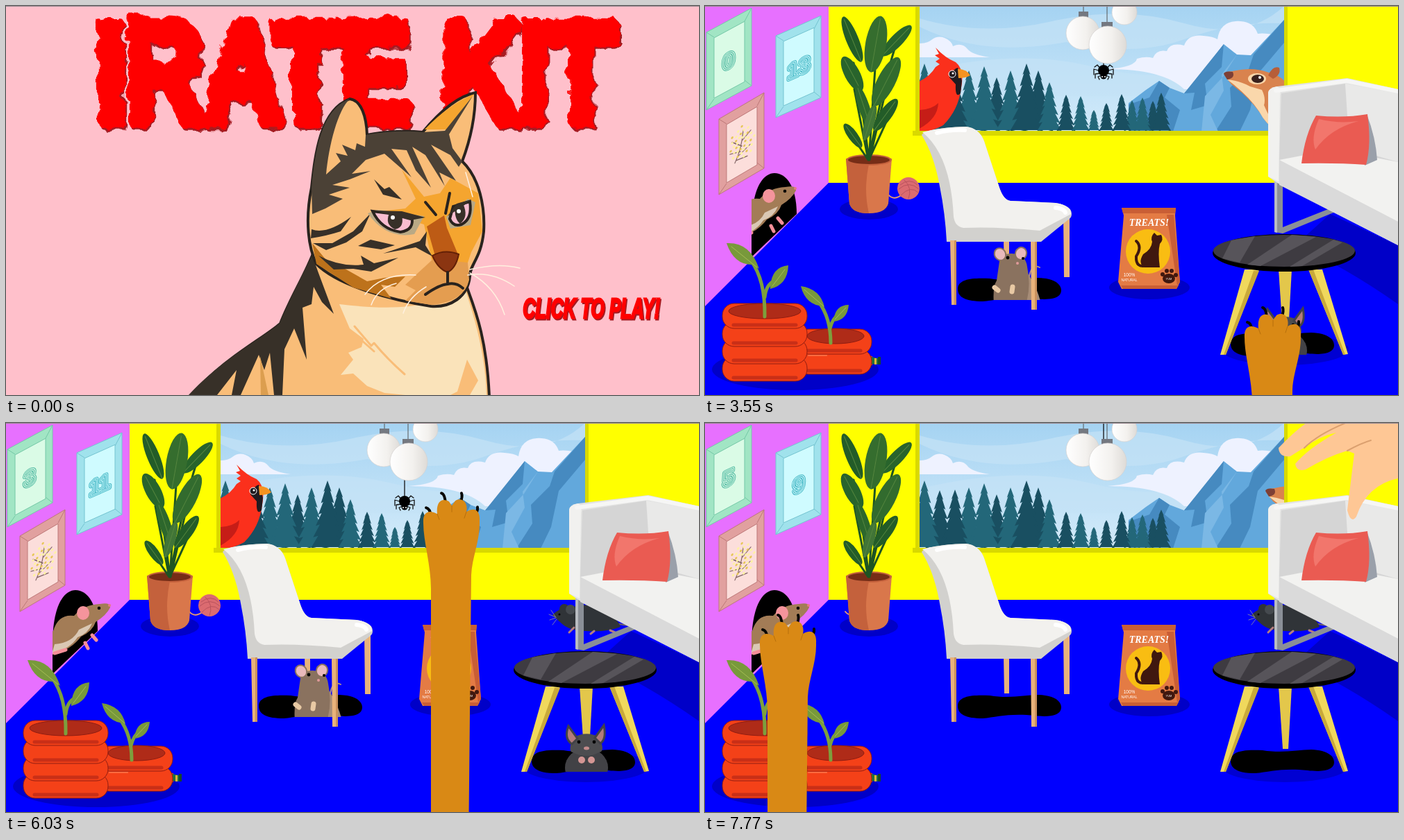
An HTML page for the animation above (8 s loop, 998 by 561 pixels).

```html
<!DOCTYPE html>
<html lang="en">
<head>
<meta charset="utf-8">
<title>Irate Kit</title>
<style>
html,body{margin:0;width:100%;height:100%;overflow:hidden;background:#ffc0cb}
svg{display:block;width:100vw;height:100vh}
text{font-family:"Liberation Sans",Arial,sans-serif;text-anchor:middle}
.line{fill:none;stroke-linecap:round;stroke-linejoin:round}
.dark{fill:#373028}
</style>
</head>
<body>
<svg viewBox="0 0 998 561">
<defs>
  <linearGradient id="sky" x2="0" y2="1"><stop stop-color="#a5d3f2"/><stop offset="1" stop-color="#d3ebfa"/></linearGradient>
  <linearGradient id="globe"><stop stop-color="#fff"/><stop offset=".6" stop-color="#f3f1ee"/><stop offset="1" stop-color="#dedbd7"/></linearGradient>
  <filter id="drip" x="-5%" y="-10%" width="110%" height="120%"><feTurbulence baseFrequency=".035" numOctaves="2" seed="4"/><feDisplacementMap in="SourceGraphic" scale="16"/></filter>
  <clipPath id="pane"><path d="M309 0H834V181H309Z"/></clipPath>
  <clipPath id="burrow"><path d="M67 230H220V400H67Z"/></clipPath>
  <clipPath id="chairPit"><path d="M360 300H520V424H360Z"/></clipPath>
  <clipPath id="tablePit"><path d="M750 380H915V503H750Z"/></clipPath>
  <path id="pit" d="M364 408C364 392 390 392 410 393C440 398 460 392 480 392C505 393 513 402 513 410C513 424 490 424 475 422C440 418 420 424 400 426C375 426 364 420 364 408Z"/>
</defs>

<g id="room">
  <path fill="#ff0" d="M178 0H998V255H178Z"/>
  <path fill="#00f" d="M0 255H998V561H0Z"/>
  <path fill="#e770ff" d="M0 0H178V255L0 433Z"/>

  <g clip-path="url(#pane)">
    <path fill="url(#sky)" d="M309 0H834V181H309Z"/>
    <path fill="#c5e3f7" opacity=".7" d="M309 18Q400 45 500 22T690 25T834 0V25Q760 22 690 48T520 52Q400 75 309 30ZM309 95Q450 60 560 88T834 80V130H309Z"/>
    <path fill="#eef2ff" d="M309 54Q320 54 326 49Q335 42 345 46Q355 50 357 58Q370 52 378 62Q384 70 410 74H309Z"/>
    <path fill="#eef2ff" d="M580 91Q620 88 622 76Q635 72 645 75Q650 62 665 65Q670 52 690 57Q696 40 718 43Q732 44 738 48Q742 20 771 22Q790 23 796 40Q812 38 834 46V120H690Q660 91 580 91Z"/>
    <path fill="#62a8dc" d="M610 140L635 121 654 108 669 118 690 126 710 104 747 55 766 70 786 71 834 20V181H610Z"/>
    <path fill="#468ac0" d="M654 108L669 118 662 132 684 150 674 181H610V142L640 132ZM747 55L744 88 720 112 724 143 700 150 705 125 690 126ZM834 20V53L796 98 785 150 770 181H735L758 145 756 118 783 91 790 70Z"/>
    <path fill="#7bb8e5" d="M766 70L744 99 747 122 728 157 739 181H715L720 130 746 102Z"/>
    <g id="trees"></g>
    <g id="bird">
      <path fill="#fb301c" d="M300 181V112Q322 105 332 88L338 84 332 80 338 76 331 71 337 69 332 60Q346 75 361 81Q374 91 369 118Q365 150 343 172Q330 179 318 181Z"/>
      <path fill="#c61d17" d="M300 150Q325 151 336 140Q335 166 300 181Z"/>
      <path fill="#211b20" d="M364 89Q368 100 370 108L368 126Q360 134 361 113L352 103Q358 90 364 89Z"/>
      <path fill="#f59320" d="M364 91Q377 91 382 100Q376 104 365 104Z"/>
      <circle cx="356" cy="98" r="5" fill="#211b20" stroke="#fff"/><circle cx="357" cy="97" r="1.5" fill="#fff"/>
    </g>
    <g id="squirrel">
      <path fill="#d9834e" d="M678 100Q678 94 690 94Q718 87 742 96Q760 100 768 113Q800 110 850 118V181H760Q740 175 730 155Q712 130 688 113Z"/>
      <path fill="#fad7ab" d="M682 106Q700 108 715 116L732 121Q738 133 735 143Q742 160 756 181Q738 172 728 152Q712 128 682 106ZM795 181Q797 158 812 149L850 145V181Z"/>
      <path fill="#854532" d="M780 127Q805 119 850 123V132Q810 131 780 127Z"/>
      <path fill="#b75e39" d="M741 100Q748 85 757 89Q760 99 748 105Z"/>
      <ellipse cx="725" cy="105" rx="13" ry="8" fill="#fad7ab"/><ellipse cx="726" cy="105" rx="9" ry="6" fill="#3a211d"/><circle cx="729" cy="103" r="2" fill="#fff"/>
      <path fill="#7d3f36" d="M677 98Q678 93 690 95Q694 104 682 106Z"/>
    </g>
  </g>
  <path fill="#d9d900" d="M303 0H309V180H834V0H839V180H845V187H299V180H303Z"/>

  <g id="spider">
    <path class="line" stroke="#111" stroke-width="1.3" d="M0-60V0M-4-2L-9-8-13-5M-4 1L-14-2-14 6M-4 4L-12 5-12 11M-3 7L-8 9-6 13M4-2L9-8 13-5M4 1L14-2 14 6M4 4L12 5 12 11M3 7L8 9 6 13"/>
    <circle r="8"/><circle cy="8" r="4.5"/><circle cx="-2" cy="9" r="1" fill="#fff"/><circle cx="2" cy="9" r="1" fill="#fff"/>
  </g>
  <path stroke="#555" d="M545 0V10M579 0V24"/>
  <path fill="#747880" d="M538 8H552V18H538ZM571 23H587V34H571Z"/>
  <g fill="url(#globe)" stroke="#d5d2d0" stroke-width=".7"><circle cx="604" cy="9" r="18"/><circle cx="544" cy="39" r="24"/><circle cx="580" cy="56" r="27"/></g>

  <g id="frames"></g>
  <g id="posy" transform="translate(53 202) skewY(-25)"></g>
  <g id="score" transform="translate(34 89) skewY(-25)"></g>
  <g id="timer" transform="translate(135 99) skewY(-24)"></g>

  <path d="M67 362V320C67 260 85 241 100 241C118 241 132 262 132 300Z"/>
  <g clip-path="url(#burrow)"><g id="holeRat">
    <path fill="#a37c56" d="M30 330L68 300Q75 275 98 278Q112 262 135 261Q151 258 150 266Q145 277 129 287Q125 300 108 308Q95 326 68 334Z"/>
    <path fill="#dac8b4" d="M124 289Q118 304 103 309Q92 326 66 333L70 319Q96 317 105 298Z"/>
    <path class="line" stroke="#f58f98" stroke-width="5" d="M114 317L118 325M124 306L130 313M70 332L86 327"/>
    <ellipse cx="111" cy="274" rx="9" ry="10" fill="#f5949c"/><circle cx="134" cy="267" r="2.3"/><circle cx="149" cy="263" r="2" fill="#e87a83"/>
  </g></g>

  <ellipse cx="236" cy="293" rx="42" ry="15" fill="#0000c8"/>
  <g id="yarn"><path class="line" stroke="#e59a70" stroke-width="2" d="M264 272Q272 282 285 271"/><circle cx="293" cy="263" r="16" fill="#db6b70"/><path class="line" stroke="#b9525c" d="M281 258Q295 247 306 258M279 264Q294 251 308 264M282 273Q296 258 307 269M287 251Q299 262 293 278"/></g>
  <path fill="#d9774b" d="M203 220L208 285Q212 299 236 299Q260 299 264 285L269 220Z"/>
  <path fill="#c4613c" d="M203 220L208 285Q212 299 236 299Q228 265 236 228Z"/>
  <ellipse cx="236" cy="222" rx="33" ry="8" fill="#c4613c"/><ellipse cx="236" cy="222" rx="30" ry="6" fill="#762d17"/>
  <path class="line" stroke="#1d5422" stroke-width="3" d="M236 222L245 90M236 222Q228 150 214 82M236 222Q252 130 275 55M235 222L215 120M237 222L263 110M236 222L262 165M235 222L210 185"/>
  <g id="leaves"></g>

  <path fill="#e8b27b" d="M430 335H438V390H431ZM516 300H525V391H517Z"/>
  <use href="#pit"/>
  <g clip-path="url(#chairPit)"><g id="chairRat">
    <path class="line" stroke="#b08f89" stroke-width="2" d="M466 394Q470 370 482 377"/>
    <path fill="#a68c77" d="M455 375Q476 395 484 430H440Z"/>
    <path fill="#8a725f" d="M424 368Q428 356 442 357Q462 358 464 376Q470 405 462 430H416Q414 405 420 396Z"/>
    <g fill="#e9b9bb" stroke="#8a725f" stroke-width="2"><ellipse cx="425" cy="358" rx="8" ry="9" transform="rotate(-30 425 358)"/><ellipse cx="455" cy="357" rx="8" ry="9" transform="rotate(20 455 357)"/></g>
    <circle cx="436" cy="363" r="2.4"/><circle cx="458" cy="364" r="2"/><circle cx="450" cy="371" r="2" fill="#e09a9a"/>
    <path class="line" stroke="#e8c9a4" stroke-width="7" d="M442 412L443 405M417 406L422 410"/>
  </g></g>
  <path fill="#d2d1ce" d="M312 186Q318 176 375 174Q395 176 402 195L424 262Q430 280 440 281L505 284Q528 288 528 300Q528 306 522 309L484 340H348Q346 300 338 260Q330 215 312 186Z"/>
  <path fill="#f2f1ee" d="M313 182Q345 174 376 174Q395 176 402 195L424 262Q430 280 440 281L505 284Q528 288 527 300L482 324Q420 318 372 320Q360 318 358 304Q354 215 313 182Z"/>
  <path class="line" stroke="#fff" stroke-width="6" d="M334 183Q352 178 374 179M505 291Q517 292 519 298"/>
  <path fill="#e8b27b" d="M353 338H362V431H355ZM469 340H478V438H470Z"/><path fill="#ca915d" d="M359 338H362V431H359ZM475 340H478V438H475Z"/>

  <ellipse cx="640" cy="406" rx="58" ry="17" fill="#0000c8"/>
  <path fill="#e47b44" d="M600 291H678L677 302 684 398 679 408H600L595 398 603 302Z"/>
  <path fill="#c95e35" d="M600 291H678L677 299H602ZM599 403H682L679 408H602ZM675 301L684 398 680 403 665 301Z"/>
  <circle cx="638" cy="354" r="32" fill="#f9bd12"/>
  <path fill="#40180f" d="M647 327L651 331 657 330Q661 337 655 343Q652 355 655 377H633Q623 371 631 358Q643 351 644 340Q641 333 647 327Z"/>
  <path class="line" stroke="#40180f" stroke-width="4" d="M637 374Q620 379 621 361Q630 347 621 339"/>
  <text x="639.5" y="317" fill="#fff" font-size="14" font-weight="700" font-style="italic" style="font-family:'Liberation Serif',serif">TREATS!</text>
  <g fill="#fff" font-size="6.5"><text x="611" y="390">100%</text><text x="611" y="397" font-size="5">NATURAL</text></g>
  <g fill="#40180f"><ellipse cx="668" cy="393" rx="9" ry="7"/><circle cx="659" cy="387" r="3"/><circle cx="665" cy="382" r="3"/><circle cx="672" cy="382" r="3"/><circle cx="678" cy="388" r="3"/></g>
  <text x="668" y="395" fill="#fff" font-size="4">YUM</text>

  <path fill="#0000c8" d="M900 300L998 345V430Q920 375 850 345Z"/>
  <g id="darkRat">
    <path class="line" stroke="#6c6266" stroke-width="2" d="M865 285Q890 294 925 293"/>
    <path fill="#303438" d="M787 277Q798 265 812 267Q835 257 860 269Q880 280 885 294Q865 302 835 300Q812 300 800 289Z"/>
    <path class="line" stroke="#b47e80" stroke-width="3" d="M818 295L811 302M847 300L842 304M870 299L877 302"/>
    <circle cx="804" cy="268" r="7" fill="#303438"/><circle cx="813" cy="269" r="7" fill="#454a4f"/><circle cx="797" cy="276" r="1.5" fill="#000"/>
    <path class="line" stroke="#96999c" stroke-width=".8" d="M792 280L782 276M792 281L783 284M793 283L787 291M791 279L785 270"/>
  </g>
  <path fill="#8a8f97" d="M820 249H832V328L820 326ZM832 319L915 286 922 291 832 328Z"/><path fill="#b8bcc1" d="M820 249H824V327L820 326Z"/>
  <path fill="#e3e3e2" d="M811 125Q812 118 824 116L925 104 998 120V345L824 255 811 246Z"/>
  <path fill="#d5d5d5" d="M830 126L922 112 928 158 998 170V235L827 222Z"/>
  <path fill="#e9e9e8" d="M922 112L998 126V225L928 205Z"/>
  <path fill="#f2f2f0" d="M827 222L905 207 998 225V311Z"/>
  <path fill="#dadada" d="M827 222L998 311V345L827 258Z"/>
  <path fill="#f1f1ef" d="M811 125Q812 118 824 116Q830 118 828 130L826 253 811 246Z"/>
  <path class="line" stroke="#f6f6f5" stroke-width="6" d="M822 122L924 108 998 123"/>
  <path fill="#9aa0aa" d="M953 156Q966 190 968 222L950 230Z"/>
  <path fill="#ea5b52" d="M880 158Q920 162 954 156Q960 200 952 229Q910 226 859 227Q864 185 880 158Z"/>
  <path fill="#f2766c" d="M884 163Q912 170 941 166Q900 177 879 207Q872 190 884 163Z"/>

  <ellipse cx="835" cy="495" rx="92" ry="23" fill="#0000d2"/>
  <use href="#pit" x="393" y="79"/>
  <path fill="#e3c74b" d="M826 380H845L840 470H832Z"/>
  <g clip-path="url(#tablePit)"><g id="tableRat">
    <ellipse cx="836" cy="497" rx="31" ry="28" fill="#424246"/>
    <path fill="#4d4d50" d="M816 454Q836 443 854 453Q864 474 854 475Q836 485 816 475Q809 474 816 454Z"/>
    <g fill="#b27b7b" stroke="#424246" stroke-width="3"><path d="M823 455L810 437Q803 455 815 463ZM848 454L861 436Q865 456 856 462Z"/></g>
    <circle cx="825" cy="460" r="2.4"/><circle cx="847" cy="460" r="2.4"/><ellipse cx="836" cy="469" rx="4" ry="2.5" fill="#c38b8b"/>
    <g fill="#d49694"><circle cx="829" cy="486" r="5"/><circle cx="843" cy="486" r="5"/></g>
  </g></g>
  <path fill="#f0d85c" d="M777 380H798L750 503H742ZM869 380H889L926 502 919 503Z"/><path fill="#c9a93a" d="M790 382H798L750 503H747ZM869 380H876L922 503H919Z"/>
  <ellipse cx="834" cy="356" rx="103" ry="27"/><ellipse cx="834" cy="353" rx="102" ry="23" fill="#3e3b41"/>
  <path fill="#57545a" d="M758 338L792 332 770 370 745 364ZM845 330L880 333 800 375 781 373ZM905 337L918 341 860 375 842 376Z"/>

  <ellipse cx="130" cy="524" rx="120" ry="30" fill="#0000c8"/>
  <g id="nozzle"><path fill="#e23a1b" d="M228 505H241V518H228Z"/><path fill="#24733b" d="M239 506L249 508V517L239 516Z"/><path fill="#e6b53b" d="M244 508H247V517H244Z"/><path fill="#17452b" d="M249 506H253V517H249Z"/></g>
  <g id="hoses"></g>
  <g class="line" stroke="#7d9f3d" stroke-width="5"><path d="M86 448Q87 395 66 367M86 420Q88 402 99 397M181 486Q181 450 164 427M180 465Q184 450 192 445"/></g>
  <g fill="#78993b"><path d="M69 373Q42 374 31 342Q65 340 78 379ZM94 405Q96 376 120 374Q119 402 94 408ZM171 433Q145 432 138 404Q166 408 172 434ZM185 453Q188 431 207 431Q205 453 185 455Z"/></g>
  <path class="line" stroke="#a6bd55" d="M38 347L75 377M97 404L115 380M143 409L171 433M187 452L203 435"/>

  <g id="hand">
    <path fill="#fec795" d="M838 204Q800 190 760 190Q722 194 690 208Q660 225 629 258Q630 272 646 270L665 258Q690 240 712 236Q670 260 653 281Q655 293 668 289Q700 270 728 262L738 266Q730 330 728 348Q733 368 741 357Q756 312 800 302Q850 290 880 250L1250-274 1200-364Z"/>
    <path class="line" stroke="#dba06f" stroke-width="2" d="M666 258Q692 232 755 211M728 262Q748 251 762 247M806 298Q840 280 850 262"/>
  </g>
  <g id="paw">
    <path class="line" stroke="#080704" stroke-width="4" d="M-15 2Q-10 3-9 17M14 2Q16 7 12 17M-37 23Q-31 24-30 36M37 22Q38 29 31 36"/>
    <path fill="#d98915" d="M-30 620V140C-30 105-41 72-41 45C-42 30-34 25-21 32C-23 14-14 8-4 14L0 20 5 13C15 7 24 16 21 29C34 21 41 28 40 42C41 70 29 95 28 120L23 620Z"/>
    <path class="line" stroke="#b66f0c" d="M-21 32L-18 40M0 20V29M21 29L18 38"/>
  </g>
</g>

<g id="intro">
  <path fill="#ffc0cb" d="M0 0H998V561H0Z"/>
  <g filter="url(#drip)" stroke-linejoin="round" font-weight="700">
    <g id="title" transform="translate(499 162) scale(1 1.3)" font-size="155" stroke-width="15"></g>
  </g>
  <g id="prompt" transform="translate(843 450) scale(1 1.6)" font-size="25" font-weight="700" font-style="italic" stroke-width="1.8"></g>

  <path fill="#f9bd78" stroke="#29231e" stroke-width="4" d="M265 564C310 510 370 480 395 458C412 415 430 390 445 350L660 395C672 430 692 470 696 564Z"/>
  <path fill="#fae3ba" d="M480 430C560 440 620 435 660 405C675 450 690 500 692 561H668L680 540 664 510 650 556 640 561H575L545 558 520 548 500 530 482 532 500 510 493 500 512 492 515 480 495 465Z"/>
  <path class="line" stroke="#f9bd78" stroke-width="3" d="M502 462L526 490 530 486Q550 510 574 531M512 482L530 498"/>
  <path class="dark" d="M263 561C310 510 365 482 394 458C410 420 428 385 441 360L450 385 472 444 455 427 443 405 440 430 427 435 433 510 415 465 401 495 398 561H386L380 500 372 525 364 503 338 561H325L332 525 304 561Z"/>
  <path fill="#dc9e4f" d="M366 505L378 561H367Z"/>
  <path id="head" fill="#f9bd78" stroke="#29231e" stroke-width="4" d="M440 262C445 215 452 150 495 134C512 136 519 160 520 186C548 180 580 180 600 182C625 152 650 130 676 125C676 160 668 195 657 224C682 248 690 290 688 325C684 365 668 372 668 390C665 420 640 435 612 433C560 425 480 405 447 372C436 350 430 310 440 262Z"/>
  <path fill="#f5a52f" d="M570 236L602 275 625 270 640 248 680 270 686 325 670 355 655 400 615 375 602 315 540 296 575 292 590 278ZM603 178Q637 142 674 127L636 178Z"/>
  <path fill="#bd721b" d="M441 342L460 365 490 380 520 397 545 392 575 390 560 405 540 402 555 422 500 406 447 372Z"/>
  <path fill="#e49d50" d="M590 388L615 365 665 370 667 395Q660 427 612 431L575 425 590 410 575 402Z"/>
  <path fill="#4b4136" d="M440 262C445 215 452 150 495 134C478 150 465 200 461 243L482 224 475 212 492 216 484 200 503 208 505 198 517 203 518 186C548 180 580 180 600 182L632 180 672 130 638 185 643 205 657 224 652 232 640 215 612 200 648 252 624 240 632 260 604 215 585 203 612 262 590 237 577 208 555 206 584 247 545 213 518 222 498 242 525 238 495 250 470 258 495 262 465 272 485 278 460 292 441 300Z"/>
  <path class="dark" d="M530 250L545 264 552 261 570 279 543 272ZM440 322Q462 330 497 304L482 325Q460 332 439 335ZM442 342L470 342 500 325 525 299 513 325 490 341 461 352ZM450 360Q482 377 515 373L511 360 530 371 565 363 526 383 500 379 472 380ZM507 346L525 337 560 345 540 351ZM543 357L596 339 606 325 604 345 614 361 590 348Z"/>
  <path fill="#b9a985" d="M521 299L535 294 602 303 588 329Q548 337 521 299ZM634 304L665 278 676 283 669 316 640 321Z"/>
  <g fill="#f8bdd0" stroke="#29231e" stroke-width="4"><path d="M528 296L584 303Q589 323 568 326Q540 322 528 296ZM639 307L644 289 668 282Q672 307 656 315Q644 319 639 307Z"/></g>
  <path class="dark" d="M552 299L570 302Q574 320 560 322Q545 315 552 299ZM647 289L658 285Q667 304 654 314Q645 307 647 289ZM530 295L570 296 604 305 582 309ZM636 303L649 285 670 279 659 288Z"/>
  <circle cx="557" cy="305" r="3" fill="#fff"/><circle cx="652" cy="296" r="3" fill="#fff"/>
  <path fill="#bd5b15" d="M606 318L631 302 635 320 650 356 619 364Z"/><path fill="#8b3511" stroke="#632006" stroke-width="2" d="M614 360Q632 350 652 358Q648 378 636 384Q622 379 614 360Z"/>
  <path class="line" stroke="#29231e" stroke-width="4" d="M636 384V401Q624 402 604 416M636 401Q648 398 658 407M604 283L619 301M639 270L633 299"/>
  <path class="line" stroke="#fff0df" stroke-width="1.5" d="M668 380Q710 370 740 378M668 385Q705 405 718 445M665 388Q700 382 732 404M590 388Q540 385 517 416M605 405Q580 420 572 443M562 400Q535 407 526 431M672 275L662 240"/>
</g>
<path stroke="#9b8a92" d="M0 .5H998"/>
</svg>
<script>
const el = id => document.getElementById(id);
const fill = (id, parts) => el(id).innerHTML = parts.join('');

function tree([x, top], i) {
  const h = 181 - top, right = [], left = [];
  for (let k = 1; k < 7; k++) {
    const y = top + h * k / 6, w = 2 + h * .038 * k;
    right.push(`${x + w} ${y}`, `${x + w * .65} ${y - 2}`);
    left.unshift(`${x - w * .65} ${y - 2}`, `${x - w} ${y}`);
  }
  return `<path fill="${i % 2 ? '#236779' : '#194f61'}" d="M${x} ${top}L${right.join(' ')} ${left.join(' ')}Z"/>`;
}
fill('trees', [[338,97],[380,93],[420,103],[440,93],[480,93],[560,150],[578,140],[615,136],[645,137],
  [316,83],[360,96],[402,87],[463,83],[496,110],[520,128],[541,130],[600,127],[630,132],[657,125]].map(tree));

fill('frames', [[2,38,65,35,112,'#a1e5c4','#dafbe6','#75c8a7'], [102,43,65,29,118,'#a0e2ec','#cffbff','#74c4d1'], [20,163,65,38,109,'#e1a09f','#fcdedb','#bd7878']]
  .map(([x, y, w, rise, h, border, paper, edge]) =>
    `<path fill="${border}" stroke="${edge}" d="M${x} ${y}l${w}-${rise}v${h}l-${w} ${rise}z"/>
     <path stroke="${edge}" d="M${x} ${y}l11 7M${x + w} ${y - rise}l-10 19M${x + w} ${y - rise + h}l-10-8M${x} ${y + h}l11-16"/>
     <path fill="${paper}" stroke="${edge}" d="M${x + 11} ${y + 8}l44-${rise * .68}v${h - 25}l-44 ${rise * .68}z"/>`));

const stems = '<path class="line" stroke="#826465" stroke-width="1.3" d="M-10 20Q0 4 2-22M0 0L-14-12M1-8L13-17M-5 12L12 3M-2 7L-17 4M-8 17L8 18"/>';
fill('posy', [stems, ...Array.from({length: 38}, (_, i) => {
  const a = i * 2.4, r = 5 + i * .38;
  return `<circle cx="${r * Math.cos(a)}" cy="${-5 + 1.25 * r * Math.sin(a)}" r="1.7" fill="${i % 3 ? '#fff2a1' : '#e6c757'}"/>`;
})]);

fill('leaves', [[212,48,9,35,-22,'#235c28'],[276,50,9,30,44,'#28642c'],[246,55,15,41,10,'#356d2e'],[212,98,11,28,-28,'#28642c'],[261,109,13,39,27,'#326b2e'],[260,157,9,28,36,'#235c28'],[229,146,8,33,-18,'#2d672c'],[237,168,7,27,17,'#417537'],[213,187,7,21,-36,'#235c28']]
  .map(([x, y, rx, ry, turn, color]) => `<g transform="translate(${x} ${y}) rotate(${turn})" fill="${color}"><ellipse rx="${rx}" ry="${ry}"/><path fill="#184a22" d="M0-${ry}Q${rx * 2}0 0 ${ry}Z"/><path stroke="#55853f" d="M0-${ry - 4}V${ry}"/></g>`));

const coil = (x, y, w) => `<rect x="${x}" y="${y}" width="${w}" height="36" rx="17" fill="#f44118" stroke="#8f1d12"/><path class="line" stroke="#c92f17" stroke-width="5" d="M${x + 16} ${y + 31}H${x + w - 16}"/><path class="line" stroke="#ff6b40" stroke-width="2" d="M${x + 17} ${y + 9}H${x + w * .4}"/>`;
const mouth = (x, y, rx) => `<ellipse cx="${x}" cy="${y}" rx="${rx}" ry="11" fill="#af2b18" stroke="#8f1d12"/>`;
fill('hoses', [coil(132, 495, 108), coil(132, 466, 108), mouth(188, 476, 41), ...[505, 480, 455, 429].map(y => coil(25, y, 122)), mouth(86, 440, 52)]);

const shadowed = (s, d) => [`<text x="${d}" y="${d}" fill="#a51b22" stroke="#a51b22">${s}</text>`, `<text fill="#f00" stroke="#f00">${s}</text>`];
fill('title', shadowed('IRATE KIT', 2));
fill('prompt', shadowed('CLICK TO PLAY!', 1.5));

// Nested strokes give the digits their parallel lines.
const digits = (id, value, ink, paper) => fill(id, [[7, ink], [5, paper], [3, ink], [1, paper]]
  .map(([w, c]) => `<text font-size="29" fill="none" stroke="${c}" stroke-width="${w}" stroke-linejoin="round">${value}</text>`));

const steps = [0,1490,1750,2020,2290,2560,2790,3020,3250,3550,3800,4040,4270,4520,4790,5040,5280,5530,5780,6030,6280,6530,6780,7040,7270,7540,7770];
const hits = [3800, 4790, 5280, 6280, 7270];

// Linear track through [time, value] keys.
function track(t, keys) {
  if (t <= keys[0][0]) return keys[0][1];
  for (let i = 1; i < keys.length; i++) {
    const [t0, v0] = keys[i - 1], [t1, v1] = keys[i];
    if (t <= t1) return v0 + (v1 - v0) * (t - t0) / (t1 - t0);
  }
  return keys.at(-1)[1];
}
const move = (id, x, y) => el(id).setAttribute('transform', `translate(${x} ${y})`);

function draw(t) {
  el('intro').style.display = t < 1490 ? '' : 'none';
  digits('score', hits.filter(h => h <= t).length, '#55bca4', '#dafbe6');
  digits('timer', 15 - Math.max(0, Math.ceil((t - 2289) / 1000)), '#42b6c4', '#cffbff');

  move('bird', track(t, [[2290,-80],[3250,0],[7040,0],[7270,-80]]), 0);
  move('squirrel', track(t, [[3020,165],[3550,70],[4040,0],[5280,0],[5530,110],[5780,180],[7270,180],[7540,165],[7770,130]]), 0);
  el('squirrel').style.filter = t >= 5280 && t < 6030 ? 'hue-rotate(245deg)' : '';
  move('spider', 574, track(t, [[2020,55],[2290,68],[3550,93],[4040,113],[6030,113],[6530,50]]));
  move('holeRat', track(t, [[2290,-95],[3250,-25],[3550,-19],[4040,0]]), 0);
  move('yarn', track(t, [[2290,-62],[3250,0],[6030,0],[6530,-62]]), 0);
  move('chairRat', 0, track(t, [[2290,85],[3250,0],[6030,0],[6530,85]]));
  move('tableRat', 0, track(t, [[2560,75],[3250,0],[3550,0],[4040,75],[5280,75],[5530,54],[6030,0],[7270,0],[7540,75]]));
  move('darkRat', track(t, [[5040,150],[5530,53],[6030,0]]), 0);
  move('nozzle', track(t, [[1750,-30],[2290,0]]), 0);

  const away = track(t, [[3550,1.7],[4270,0],[4790,0],[5280,1.7],[7270,1.7],[7770,1]]);
  move('hand', 197 * away, -222 * away);
  const pawX = track(t, [[1490,596],[2020,594],[2290,633],[2790,760],[3250,826],[3550,818],[4040,815],[4520,765],[5530,766],[6280,580],[6780,456],[7040,391],[7270,345],[7770,120]]);
  const pawY = track(t, [[1490,374],[1750,388],[2560,440],[3550,433],[3800,438],[4520,223],[4790,215],[5280,120],[5530,114],[6780,77],[7040,75],[7270,110],[7770,275]]);
  move('paw', pawX, pawY);
}

let shown = -1;
function tick() {
  const now = performance.now() % 8000;
  const t = steps.findLast(s => s <= now);
  if (t !== shown) draw(shown = t);
  requestAnimationFrame(tick);
}
tick();
</script>
</body>
</html>
```
